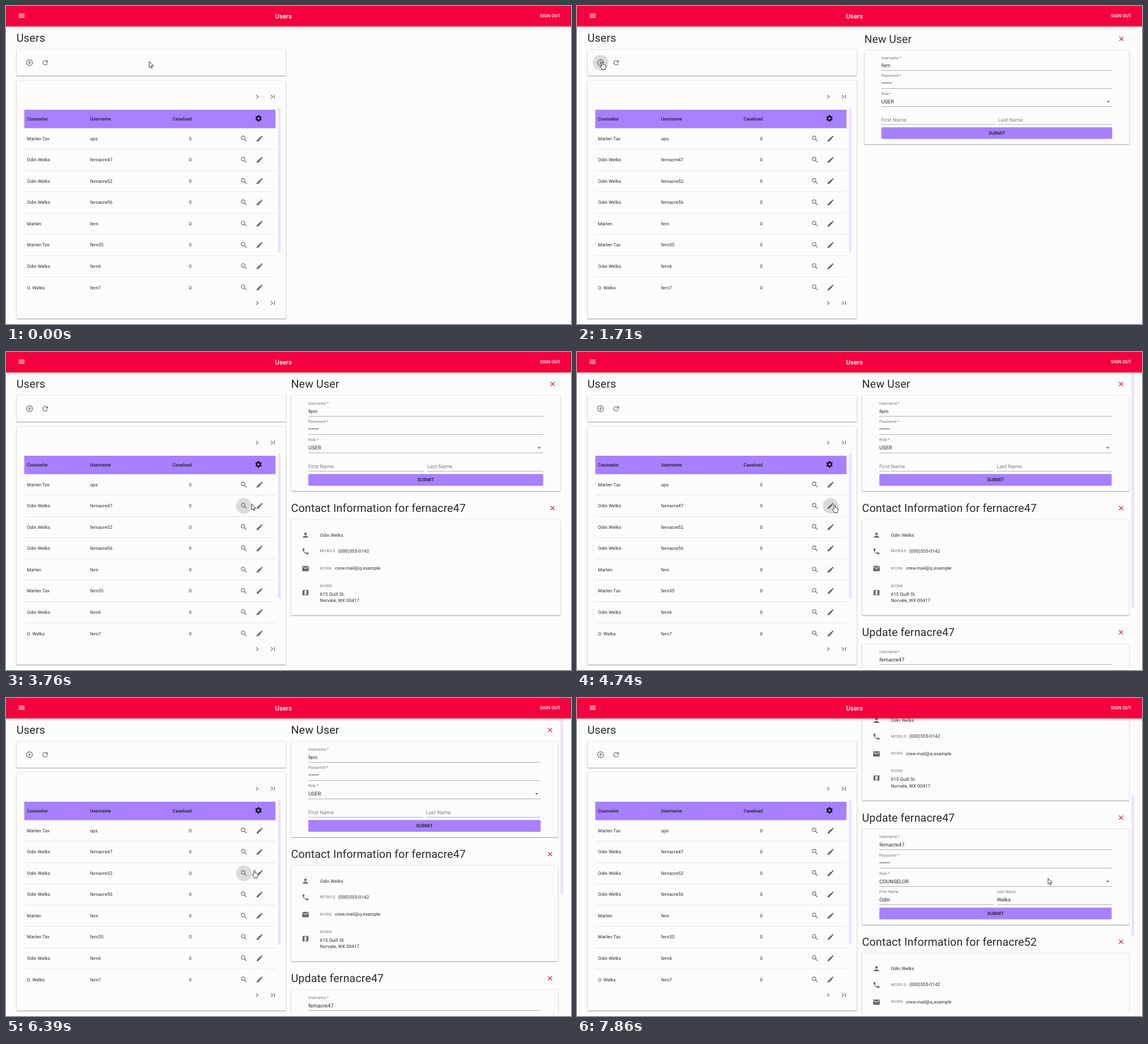
These frames come from a looping animation (998x561 px, 8000 ms). An HTML page:

```html
<!DOCTYPE html>
<html lang="en">
<head>
<meta charset="utf-8">
<title>Users</title>
<style>
html, body { margin: 0; width: 100%; height: 100%; overflow: hidden; background: #fcfcfc; }
svg { display: block; width: 998px; height: 561px; }
text { font-family: Roboto, Arial, sans-serif; fill: #2a2a2a; white-space: pre; text-rendering: geometricPrecision; }
.paper { fill: #fcfcfc; filter: drop-shadow(0 1.1px .3px rgba(0,0,0,.3)) drop-shadow(0 .3px 1px rgba(0,0,0,.2)); }
.bar { fill: #f4003e; filter: drop-shadow(0 1px 2px rgba(0,0,0,.3)); }
.cell { font-size: 8.08px; letter-spacing: .0107em; }
.head { font-size: 8.08px; font-weight: 500; fill: #1c1c1c; }
.title { font-size: 19.6px; letter-spacing: .00735em; }
.label { font-size: 6.92px; fill: #757575; }
.over { font-size: 6.92px; fill: #757575; letter-spacing: .0833em; }
.field { font-size: 9.23px; }
.hint { font-size: 9.23px; fill: #808080; }
.app { font-size: 11.54px; font-weight: 500; fill: #fff; }
.out { font-size: 8.08px; font-weight: 500; fill: #fff; }
</style>
</head>
<body>
<svg viewBox="0 0 998 561">
  <defs><clipPath id="view"><rect x="496" y="36" width="502" height="521"/></clipPath></defs>
  <g id="page"></g>
  <g id="hover"></g>
  <g id="rows"></g>
  <g clip-path="url(#view)"><g id="side"></g></g>
  <g id="top"></g>
  <path id="cursor" fill="#fff" stroke="#222" stroke-width=".9" stroke-linejoin="round"/>
</svg>
<script>
const LOOP = 8000, GREY = '#666', PURPLE = '#a780ff', PALE = '#ebe0ff';
const LEFT = 503.5, TOP = 36, VIEW = 521, STRIDE = 219, ROW = 37.52, RADIUS = 13.85;

const ICONS = {
  menu: 'M3 18h18v-2H3v2zm0-5h18v-2H3v2zm0-7v2h18V6H3z',
  add: 'M13 7h-2v4H7v2h4v4h2v-4h4v-2h-4V7zm-1-5C6.48 2 2 6.48 2 12s4.48 10 10 10 10-4.48 10-10S17.52 2 12 2zm0 18c-4.41 0-8-3.59-8-8s3.59-8 8-8 8 3.59 8 8-3.59 8-8 8z',
  refresh: 'M17.65 6.35C16.2 4.9 14.21 4 12 4c-4.42 0-7.99 3.58-7.99 8s3.57 8 7.99 8c3.73 0 6.84-2.55 7.73-6h-2.08c-.82 2.33-3.04 4-5.65 4-3.31 0-6-2.69-6-6s2.69-6 6-6c1.66 0 3.14.69 4.22 1.78L13 11h7V4l-2.35 2.35z',
  next: 'M10 6L8.59 7.41 13.17 12l-4.58 4.59L10 18l6-6z',
  last: 'M5.59 7.41L10.18 12l-4.59 4.59L7 18l6-6-6-6zM16 6h2v12h-2z',
  search: 'M15.5 14h-.79l-.28-.27C15.41 12.59 16 11.11 16 9.5 16 5.91 13.09 3 9.5 3S3 5.91 3 9.5 5.91 16 9.5 16c1.61 0 3.09-.59 4.23-1.57l.27.28v.79l5 4.99L20.49 19l-4.99-5zm-6 0C7.01 14 5 11.99 5 9.5S7.01 5 9.5 5 14 7.01 14 9.5 11.99 14 9.5 14z',
  edit: 'M3 17.25V21h3.75L17.81 9.94l-3.75-3.75L3 17.25zM20.71 7.04c.39-.39.39-1.02 0-1.41l-2.34-2.34c-.39-.39-1.02-.39-1.41 0l-1.83 1.83 3.75 3.75 1.83-1.83z',
  close: 'M19 6.41L17.59 5 12 10.59 6.41 5 5 6.41 10.59 12 5 17.59 6.41 19 12 13.41 17.59 19 19 17.59 13.41 12z',
  drop: 'M7 10l5 5 5-5z',
  person: 'M12 12c2.21 0 4-1.79 4-4s-1.79-4-4-4-4 1.79-4 4 1.79 4 4 4zm0 2c-2.67 0-8 1.34-8 4v2h16v-2c0-2.66-5.33-4-8-4z',
  phone: 'M6.62 10.79c1.44 2.83 3.76 5.14 6.59 6.59l2.2-2.2c.27-.27.67-.36 1.02-.24 1.12.37 2.33.57 3.57.57.55 0 1 .45 1 1V20c0 .55-.45 1-1 1-9.39 0-17-7.61-17-17 0-.55.45-1 1-1h3.5c.55 0 1 .45 1 1 0 1.25.2 2.45.57 3.57.11.35.03.74-.25 1.02l-2.2 2.2z',
  mail: 'M20 4H4c-1.1 0-2 .9-2 2v12c0 1.1.9 2 2 2h16c1.1 0 2-.9 2-2V6c0-1.1-.9-2-2-2zm0 4l-8 5-8-5V6l8 5 8-5v2z',
  map: 'M20.5 3l-.16.03L15 5.1 9 3 3.36 4.9c-.21.07-.36.25-.36.48V20.5c0 .28.22.5.5.5l.16-.03L9 18.9l6 2.1 5.64-1.9c.21-.07.36-.25.36-.48V3.5c0-.28-.22-.5-.5-.5zM15 19l-6-2.11V5l6 2.11V19z'
};
const ARROW = 'M0 0V10.6L2.5 8.3 4.1 12 5.7 11.3 4.1 7.7H7.3Z';
const HAND = 'M-1.2 7.6V.8C-1.2-.4 1.2-.4 1.2.8V4.8C1.4 4 3 4.1 3 5.2c.4-.7 1.7-.5 1.7.5.6-.5 1.4 0 1.4.9V9.5L4.9 11.8V13.5H-.9V12L-3.8 8.2C-4.4 7-2.6 6.3-1.2 7.6Z';

const PEOPLE = [
  ['Marlen Tav', 'ops'], ['Odin Welks', 'fernacre47'], ['Odin Welks', 'fernacre52'],
  ['Odin Welks', 'fernacre56'], ['Marlen', 'fern'], ['Marlen Tav', 'fern35'],
  ['Odin Welks', 'fern6'], ['O. Welks', 'fern7']
];

const rowY = i => 234 + i * ROW;
const BUTTONS = [[41.5, 100], ...PEOPLE.flatMap((_, i) => [[420.3, rowY(i)], [448, rowY(i)]])];

// Pointer strokes: start, end, x and y of the tip at the end.
const START = [253, 98];
const STROKES = [
  [400, 790, 491, 13], [790, 1500, 45, 99], [1860, 2580, 423, 227], [2580, 3240, 422, 267],
  [3500, 4140, 455, 270], [4740, 5160, 432, 290], [5160, 5380, 449, 298], [5420, 5580, 424, 304],
  [6250, 6520, 452, 304], [6920, 7200, 600, 270], [7200, 7610, 834, 319], [7610, 7860, 832, 318]
];

const $ = id => document.getElementById(id);
const clamp = (v, lo, hi) => Math.min(hi, Math.max(lo, v));
const smooth = p => p * p * (3 - 2 * p);
const rect = (x, y, w, h, attr) => `<rect x="${x}" y="${y}" width="${w}" height="${h}" ${attr}/>`;
const line = (x1, x2, y, color) => rect(x1, y - .35, x2 - x1, .7, `fill="${color}"`);
const text = (cls, x, y, size, str, anchor = 'start') =>
  `<text class="${cls}" x="${x}" y="${y + size * .356}" text-anchor="${anchor}">${str}</text>`;
const cell = (x, y, str, anchor) => text('cell', x, y, 8.08, str, anchor);
const head = (x, y, str, anchor) => text('head', x, y, 8.08, str, anchor);
const icon = (name, x, y, color = GREY) =>
  `<path d="${ICONS[name]}" fill="${color}" transform="translate(${x} ${y}) scale(.577) translate(-12 -12)"/>`;
const paper = (x, y, w, h) => rect(x, y, w, h, 'class="paper" rx="1"');

function gear(x, y) {
  let s = `<g transform="translate(${x} ${y}) scale(.577)"><circle r="5.4" fill="none" stroke="#111" stroke-width="3.8"/>`;
  for (let a = 0; a < 360; a += 60)
    s += `<path d="M-2.9-6L-2.2-10H2.2L2.9-6Z" fill="#111" transform="rotate(${a})"/>`;
  return s + '</g>';
}

function drawPage() {
  $('page').innerHTML = text('title', 18.5, 56.3, 19.6, 'Users') +
    paper(18.5, 77, 476, 46) + paper(18.5, 132, 476, 419.5) +
    rect(32.3, 183, 443.7, 32.5, `fill="${PURPLE}"`) +
    rect(480.6, 179, 4.4, 256, `fill="${PALE}"`);
  let s = icon('add', 41.5, 100) + icon('refresh', 69.2, 100) +
    head(37, 198.7, 'Counselor') + head(148.4, 198.7, 'Username') +
    head(328, 198.7, 'Caseload', 'end') + gear(446, 198.2);
  for (const y of [160, 524]) s += icon('next', 443.6, y) + icon('last', 471.3, y);
  PEOPLE.forEach(([name, login], i) => {
    const y = rowY(i);
    s += cell(37, y, name) + cell(148.4, y, login) + cell(328, y, '0', 'end') +
      icon('search', 420.3, y) + icon('edit', 448, y);
    if (i < PEOPLE.length - 1) s += line(32.3, 476, y + ROW / 2, '#dcdcdc');
  });
  $('rows').innerHTML = s;
  $('top').innerHTML = rect(-4, -4, 1006, 40, 'class="bar"') + icon('menu', 27.6, 17.3, '#fff') +
    text('app', 490, 17.5, 11.54, 'Users', 'middle') + text('out', 943, 17, 8.08, 'SIGN OUT');
}

function frame(title, right) {
  return text('title', LEFT, 56.3, 19.6, title) + icon('close', right - 14.2, 56.5, '#c4102c') +
    paper(LEFT, 77, right - LEFT, 168.4);
}

function form(right, title, login, role, first, family) {
  const x = 534, end = right - 30.8, mid = (x + end) / 2, rule = '#8f8f8f';
  const label = (lx, y, str) => text('label', lx, y, 6.92, str);
  const value = (lx, y, str) => text('field', lx, y, 9.23, str);
  const name = (lx, str, val) => val
    ? label(lx, 187.3, str) + value(lx, 201.3, val)
    : text('hint', lx, 201.4, 9.23, str);
  return frame(title, right) +
    label(x, 90.2, 'Username *') + value(x, 104.4, login) + line(x, end, 113.3, rule) +
    label(x, 122.6, 'Password *') + value(x, 136, '••••••') + line(x, end, 145.7, rule) +
    label(x, 154.9, 'Role *') + value(x, 169, role) + line(x, end, 178, rule) +
    icon('drop', end - 7, 169) +
    name(x, 'First Name', first) + line(x, mid - 2.3, 210.2, rule) +
    name(mid + 2.2, 'Last Name', family) + line(mid + 2.2, end, 210.2, rule) +
    rect(x, 215.2, end - x, 20.8, `rx="2" fill="${PURPLE}"`) +
    head(mid, 225.5, 'SUBMIT', 'middle');
}

function contact(right, login) {
  const x = 554.5, over = (y, str) => text('over', x, y, 6.92, str);
  return frame('Contact Information for ' + login, right) +
    icon('person', 529, 104) + cell(x, 104, 'Odin Welks') +
    icon('phone', 529, 132.7) + over(132, 'MOBILE') + cell(587, 131.8, '(000)555-0142') +
    icon('mail', 529, 163.2) + over(162.5, 'WORK') + cell(581, 162.3, 'crew.mail@q.example') +
    icon('map', 529, 205.6) + over(193.2, 'WORK') +
    cell(x, 207.9, '615 Quill St.') + cell(x, 219.4, 'Norvale, WX 00417');
}

const update = (right, login) => form(right, 'Update ' + login, login, 'COUNSELOR', 'Odin', 'Welks');

const PANELS = [
  [1560, r => form(r, 'New User', 'fern', 'USER')],
  [3350, r => contact(r, 'fernacre47')],
  [4460, r => update(r, 'fernacre47')],
  [5830, r => contact(r, 'fernacre52')],
  [6900, r => update(r, 'fernacre52')]
];

// Panels grow from three quarters of their size while fading in.
function panel([start, make], i, right, t) {
  const e = 1 - Math.pow(1 - clamp((t - start) / 230, 0, 1), 2.5), cx = (LEFT + right) / 2;
  const grow = e < 1
    ? ` translate(${cx} 144) scale(${.75 + .25 * e}) translate(${-cx} -144)` : '';
  return `<g opacity="${Math.min(1, e * 1.08)}" transform="translate(0 ${i * STRIDE})${grow}">${make(right)}</g>`;
}

let drawn = '';
function drawSide(t) {
  const open = PANELS.filter(([start]) => t >= start);
  const content = open.length * 218, long = content > VIEW, right = long ? 975.2 : 979.7;
  // The wheel turns in two notches.
  const scroll = 141.75 * clamp(Math.floor((t - 7620) / 120), 0, 2);
  let s = `<g transform="translate(0 ${-scroll})">` +
    open.map((p, i) => panel(p, i, right, t)).join('') + '</g>';
  if (long)
    s += rect(979.6, TOP + scroll * VIEW / content, 4.4, VIEW * VIEW / content, `fill="${PALE}"`);
  if (s !== drawn) $('side').innerHTML = drawn = s;
}

function pointer(t) {
  let [x, y] = START;
  for (const [from, to, nx, ny] of STROKES) {
    const p = smooth(clamp((t - from) / (to - from), 0, 1));
    x += (nx - x) * p;
    y += (ny - y) * p;
  }
  return [x, y];
}

const buttonAt = ([x, y]) => BUTTONS.find(([bx, by]) => Math.hypot(x - bx, y - by) < RADIUS);

function draw(t) {
  drawSide(t);
  const tip = pointer(t), lit = buttonAt(pointer(t - 130)); // buttons light up a little late
  $('hover').innerHTML = lit
    ? `<circle cx="${lit[0]}" cy="${lit[1]}" r="${RADIUS}" fill="rgba(0,0,0,.13)"/>` : '';
  $('cursor').setAttribute('d', buttonAt(tip) ? HAND : ARROW);
  $('cursor').setAttribute('transform', `translate(${tip})`);
}

const began = performance.now();
function loop() {
  draw((performance.now() - began) % LOOP);
  requestAnimationFrame(loop);
}
drawPage();
loop();
</script>
</body>
</html>
```
